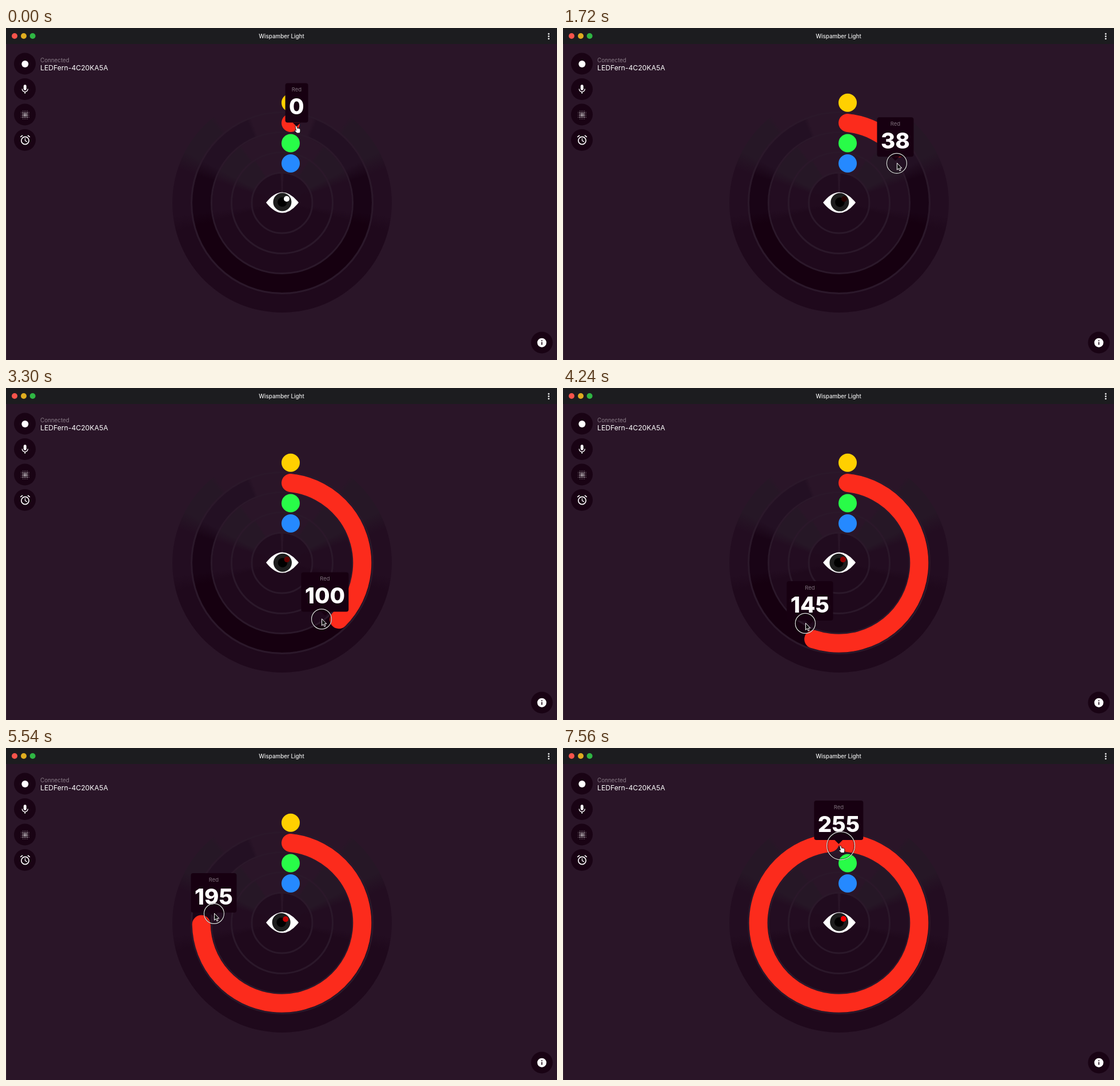
An HTML page for the animation above (7.58 s loop, 964 px wide and 581 px high).

```html
<!DOCTYPE html>
<html lang="en">
<head>
<meta charset="utf-8">
<title>Light control</title>
<style>
html, body { margin: 0; width: 100%; height: 100%; overflow: hidden; background: #2a1528; }
body { position: relative; font-family: Inter, "Open Sans", sans-serif; }
svg { position: absolute; left: 0; top: 0; }
.ring {
  position: absolute; left: 482.5px; top: 306px; box-sizing: border-box;
  width: calc(2px * var(--r)); height: calc(2px * var(--r));
  transform: translate(-50%, -50%); border-radius: 50%;
  border: 3.5px solid #2b182a; background-clip: padding-box; background-origin: border-box;
  --a: 38deg; --top: #261726; --side: #230d21; --low: #1f091c;
  background-image: conic-gradient(#2a1528 0 calc(var(--a) - 3deg), var(--top) var(--a) 62deg,
    var(--side) 72deg 97deg, var(--low) 105deg 255deg,
    var(--side) 263deg 288deg, var(--top) 298deg calc(360deg - var(--a)), #2a1528 calc(363deg - var(--a)));
}
#tip {
  position: absolute; left: 0; top: 0; height: 69px; padding: 0 6.5px; box-sizing: border-box;
  border-radius: 4px; background: #170011; text-align: center;
}
#tip::after {
  content: ""; position: absolute; left: 50%; top: 100%; margin-left: -7px;
  border: 7px solid transparent; border-top-color: #170011; border-bottom: 0;
}
#tip small { display: block; font-size: 9.5px; line-height: 24px; color: #7d6f7a; }
#tip b { display: block; font-size: 38.5px; font-weight: 800; line-height: 34px; color: #fff; }
</style>
</head>
<body>
<div class="ring" style="--r:192; border:0; --a:41deg"></div>
<div class="ring" style="--r:160; --a:23deg; --top:#231023; --side:#190416; --low:#160010"></div>
<div class="ring" style="--r:125"></div>
<div class="ring" style="--r:90; --a:34deg"></div>
<div class="ring" style="--r:54.5; --a:4deg; --top:#210c1f; --side:#210b1e; --low:#1f091c"></div>

<svg width="964" height="581">
  <path d="M.5 28V581" stroke="#3a2a38"/>
  <rect width="964" height="28" fill="#1c1c1f"/>
  <circle cx="15" cy="14" r="5" fill="#f7544b"/>
  <circle cx="31" cy="14" r="5" fill="#dfac1f"/>
  <circle cx="46.6" cy="14" r="5" fill="#2fb643"/>
  <path d="M949.5 10.3v0m0 4.2v0m0 4.2v0" stroke="#e6e6e6" stroke-width="3" stroke-linecap="round"/>
  <text x="482" y="17.6" font-size="9.8" font-weight="500" text-anchor="middle" fill="#ececec">Wispamber Light</text>
  <text x="60" y="59.6" font-size="9.8" fill="#887a86">Connected</text>
  <text x="60" y="74" font-size="12.2" fill="#fff">LEDFern-4C20KA5A</text>

  <g fill="#190314">
    <circle cx="33" cy="62.5" r="19"/>
    <circle cx="33" cy="107" r="19"/>
    <circle cx="33" cy="151.5" r="19"/>
    <circle cx="33" cy="196" r="19"/>
    <circle cx="937.5" cy="550.5" r="19"/>
  </g>
  <circle cx="33.3" cy="63" r="6" fill="#fff"/>
  <g transform="translate(23.4 97.6) scale(.82)" fill="none" stroke="#fff">
    <path d="M12 5v6" stroke-width="6" stroke-linecap="round"/>
    <path d="M5.9 11a6.1 6.1 0 0 0 12.2 0" stroke-width="1.7"/>
    <path d="M12 17v4" stroke-width="2"/>
  </g>
  <g id="grain" fill="#fff"></g>
  <g transform="translate(23.5 186.2) scale(.83)" fill="none" stroke="#fff" stroke-width="2">
    <circle cx="12" cy="13" r="8"/>
    <path d="M2 5.7 6.6 1.9M17.4 1.9 22 5.7"/>
    <path d="M12 8v5.2l4 2.4" stroke-width="1.5"/>
  </g>
  <circle cx="937.5" cy="550.7" r="8" fill="#fff"/>
  <path d="M937.5 546.2v1.7m0 1.6v5" stroke="#190314" stroke-width="1.7"/>

  <circle cx="498" cy="130.7" r="16" fill="#ffd000"/>
  <circle cx="498" cy="201.5" r="16" fill="#28fc48"/>
  <circle cx="498" cy="237" r="16" fill="#2589ff"/>
  <circle id="arc" cx="482.5" cy="306" r="140.8" pathLength="360" fill="none" stroke="#fc2b1c"
    stroke-width="32" stroke-linecap="round" transform="rotate(-83.65 482.5 306)"/>

  <path d="M455 305.5Q483.5 269.5 512 305.5Q483.5 341.5 455 305.5Z" fill="#fff"/>
  <g id="pupil">
    <circle r="16" fill="#1d1d1d"/>
    <circle r="8.3"/>
    <circle id="glint" cx="7.6" cy="-5.6" r="5"/>
  </g>
</svg>

<div id="tip"><small>Red</small><b id="num">0</b></div>

<svg width="964" height="581">
  <g id="cursor">
    <g id="press" fill="none">
      <circle id="halo" stroke="#0006" stroke-width="3"/>
      <circle id="rim" stroke="#ddd" stroke-width="1.2"/>
    </g>
    <path id="hand" fill="#fff" stroke="#111" stroke-width=".9" stroke-linejoin="round"
      d="M-2 1C-1.5-.5 .3-.5 .6 1L1.6 4.2 3 3.9 4.2 4.4 5.8 4.6 6.6 6 6.8 9 5.8 12.5H1L-3 8.6Q-3.6 7-2 7.2L-.6 8Z"/>
    <path id="arrow" fill="#111" stroke="#fff" stroke-linejoin="round"
      d="M.5-.5V11.5L3.2 9 5 13.2 7 12.3 5.2 8.3H8.9Z"/>
  </g>
</svg>

<script>
const $ = id => document.getElementById(id);
const LOOP = 7580, PRESS = 480, CX = 482.5, CY = 306, CAP = 6.35;

// time, pointer angle (degrees from top), pointer radius, value, gap under the tooltip
const keys = [
  [0, 10.8, 137, 0, 6],
  [480, 10.8, 137, 0, 6],
  [1080, 23, 134.6, 14, 7.5],
  [1220, 28, 131, 18, 8],
  [1980, 70, 118.5, 48, 8],
  [2380, 84.2, 118.1, 59, 8],
  [2740, 113, 119, 79, 8],
  [3500, 156, 121, 108, 8.5],
  [4240, 208.9, 121, 145, 9],
  [5540, 277.7, 119.6, 195, 7],
  [5780, 294.5, 121, 207, 7.5],
  [6720, 338.6, 129.3, 239, 9],
  [7560, 361.5, 135, 255, 10],
  [7580, 361.5, 135, 255, 10]
];

function sample(t) {
  const i = keys.findIndex(k => k[0] > t), a = keys[i - 1], b = keys[i];
  const f = (t - a[0]) / (b[0] - a[0]);
  return a.map((v, n) => v + (b[n] - v) * f);
}

function polar(deg, r) {
  const a = deg * Math.PI / 180;
  return [CX + r * Math.sin(a), CY - r * Math.cos(a)];
}

// Dot grid icon: dots shrink away from the middle
for (let x = -2.5; x < 3; x++) for (let y = -2.5; y < 3; y++) {
  const d = Math.hypot(x, y);
  if (d > 3) continue;
  const r = d < 1 ? 1.15 : d < 2.2 ? .8 : .45;
  $("grain").innerHTML += `<circle cx="${33.5 + x * 2.8}" cy="${152 + y * 2.8}" r="${r}"/>`;
}

function draw() {
  const t = performance.now() % LOOP;
  const [, angle, radius, raw, gap] = sample(t);
  const value = Math.round(raw), turn = value * 360 / 255;
  const [x, y] = polar(angle, radius);
  const [tx, ty] = polar(Math.max(turn, 10.9), radius);

  $("arc").setAttribute("stroke-dasharray", `${Math.max(0.01, turn - 2 * CAP)} 720`);
  $("num").textContent = value;
  $("tip").style.transform = `translate(${tx}px, ${ty - gap}px) translate(-50%, -100%)`;

  $("pupil").setAttribute("transform",
    `translate(${483.1 + (x - CX) / 80} ${305.2 + (y - CY) / 200})`);
  $("glint").setAttribute("fill", value ? `rgb(${value},0,0)` : "#fff");

  const onRing = radius > 125;
  const size = 17.5 + 7 * Math.min(1, Math.max(0, (radius - 124) / 2));
  $("cursor").setAttribute("transform", `translate(${x} ${y})`);
  $("press").setAttribute("visibility", t >= PRESS ? "visible" : "hidden");
  $("halo").setAttribute("r", size - .5);
  $("rim").setAttribute("r", size);
  $("hand").setAttribute("visibility", onRing ? "visible" : "hidden");
  $("arrow").setAttribute("visibility", onRing ? "hidden" : "visible");
  requestAnimationFrame(draw);
}
draw();
</script>
</body>
</html>
```
